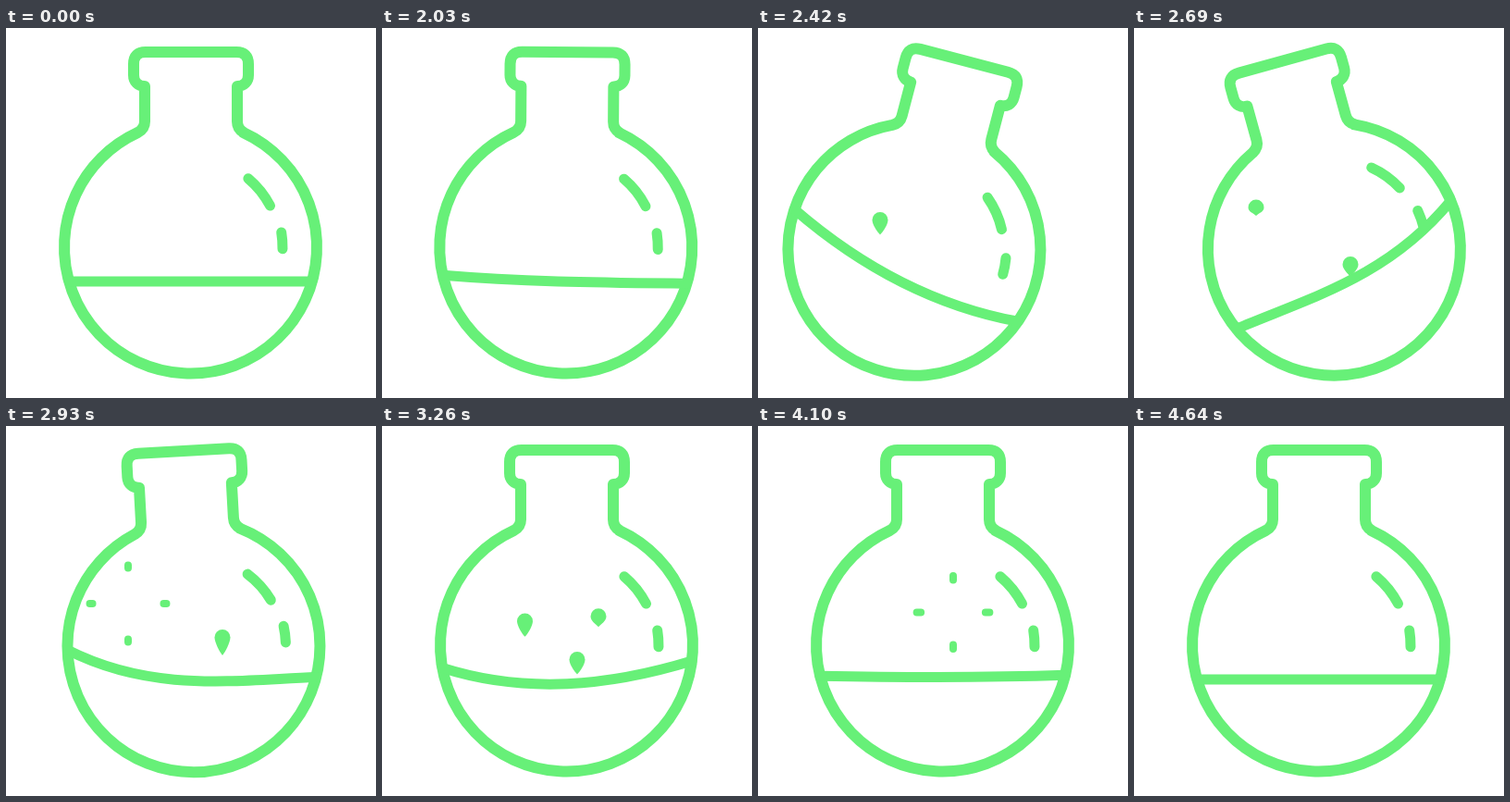
These frames come from a looping animation (400x400 px, 4670 ms). An HTML page with a canvas:

```html
<!DOCTYPE html>
<html lang="en">
<head>
<meta charset="utf-8">
<title>Bubbling flask</title>
<style>
  html, body { margin: 0; width: 100%; height: 100%; overflow: hidden; background: #fff; }
  canvas { display: block; width: 100vmin; height: 100vmin; }
</style>
</head>
<body>
<canvas id="stage" width="400" height="400"></canvas>
<script>
const ctx = document.getElementById('stage').getContext('2d');
const GREEN = '#67f078';
const LOOP = 4670;
const CX = 199.5, CY = 237, RADIUS = 136.5, LEVEL = 37;
const START = 2000, END = 4640;
const BURST_TIME = 300, BURST_REACH = 46;

const DROPS = [
  { x: 132, y: 192, start: 2035, pop: 2708 },
  { x: 234, y: 201, start: 2650, pop: 3385 },
  { x: 154.5, y: 192.5, start: 2960, pop: 3536 },
  { x: 211, y: 201.5, start: 3195, pop: 3897 },
];

const smooth = u => u * u * (3 - 2 * u);
const easeOut = u => 1 - Math.pow(1 - u, 1.7);
const radians = degrees => degrees * Math.PI / 180;

// Eased progress from 0 to 1 between two times
function ramp(t, from, to, ease = smooth) {
  return ease(Math.min(1, Math.max(0, (t - from) / (to - from))));
}

// The flask swings right, then left, then back upright
function swing(t) {
  const right = ramp(t, START, 2360);
  const left = ramp(t, 2360, 2700);
  const back = ramp(t, 2700, 3025);
  const angle = 17.5 * right - 33 * left + 15.5 * back;
  return {
    angle,
    dx: -35 * right + 52 * left - 17 * back,
    dy: 4 * (right - back) - 2 * (angle / 16) ** 2,
  };
}

const calm = t => 1 - ramp(t, 2930, END);

// The liquid is thrown to each side once, then rocks with a fading wave
function tilt(t) {
  const crest = 2690;
  if (t < crest) return -28 * ramp(t, START, 2400, easeOut) + 64 * ramp(t, 2420, crest);
  const since = t - crest;
  return 36 * calm(t) * Math.exp(-since / 490) * Math.cos(Math.PI * since / 240);
}

// Heights of the surface's four Bezier points; the middle lags behind the ends
function surface(t) {
  const rise = 18 * ramp(t, START, 2400, easeOut) * calm(t);
  const bob = 18 * calm(t) * ramp(t, 2930, 3680) * Math.sin(Math.PI * (END - t) / -320 + Math.PI);
  const lean = tilt(t), lag = 0.4 * tilt(t - 150);
  const sag = 0.38 * rise + bob;
  return [lean - rise, sag + lag, sag - lag, -lean - rise].map(y => y + LEVEL);
}

function drawOutline() {
  ctx.lineWidth = 12;
  ctx.beginPath();
  ctx.moveTo(150, 63);
  ctx.bezierCurveTo(143, 63, 138, 58, 138, 51);
  ctx.lineTo(138, 39);
  ctx.quadraticCurveTo(138, 26, 151, 26);
  ctx.lineTo(249, 26);
  ctx.quadraticCurveTo(262, 26, 262, 39);
  ctx.lineTo(262, 51);
  ctx.bezierCurveTo(262, 58, 257, 63, 250, 63);
  ctx.lineTo(250, 101);
  ctx.quadraticCurveTo(250, 109, 257, 113);
  ctx.arc(CX, CY, RADIUS, radians(-65.3), radians(245.3));
  ctx.quadraticCurveTo(150, 109, 150, 101);
  ctx.closePath();
  ctx.stroke();
}

function drawShine(radius, from, to) {
  ctx.lineWidth = 11;
  ctx.beginPath();
  ctx.arc(CX, CY, radius, radians(from), radians(to));
  ctx.stroke();
}

function drawLiquid(t) {
  const [left, inLeft, inRight, right] = surface(t);
  const edge = y => Math.sqrt(RADIUS * RADIUS - y * y);
  const x0 = CX - edge(left), x1 = CX + edge(right);
  const third = (x1 - x0) / 3;
  ctx.lineWidth = 11;
  ctx.beginPath();
  ctx.moveTo(x0, CY + left);
  ctx.bezierCurveTo(x0 + third, CY + inLeft, x1 - third, CY + inRight, x1, CY + right);
  ctx.stroke();
}

function drawFlask(t) {
  const { angle, dx, dy } = swing(t);
  ctx.save();
  ctx.translate(CX + dx, CY + dy);
  ctx.rotate(radians(angle));
  ctx.translate(-CX, -CY);
  drawOutline();
  drawShine(97, -50, -27.6);
  drawShine(99.5, -9.3, 1);
  drawLiquid(t);
  ctx.restore();
}

// A teardrop whose tail shrinks until it is a round bubble
function drawBubble({ x, y }, u) {
  const r = 8.5;
  const cy = y + 2 + 58 * (1 - easeOut(u));
  const tip = cy + r + 17.5 * (1 - u) * Math.min(1, 5 * u);
  ctx.beginPath();
  ctx.arc(x, cy, r, Math.PI, 0);
  ctx.bezierCurveTo(x + r, cy + 5, x + 3, tip - 3, x, tip);
  ctx.bezierCurveTo(x - 3, tip - 3, x - r, cy + 5, x - r, cy);
  ctx.fill();
}

function drawBurst({ x, y }, u) {
  const inner = BURST_REACH * smooth(u);
  const outer = BURST_REACH * easeOut(u) + 0.01;
  ctx.lineWidth = 8;
  ctx.beginPath();
  for (const [dx, dy] of [[1, 0], [0, 1], [-1, 0], [0, -1]]) {
    ctx.moveTo(x + dx * inner, y + dy * inner);
    ctx.lineTo(x + dx * outer, y + dy * outer);
  }
  ctx.stroke();
}

function drawDrop(drop, t) {
  const { start, pop } = drop;
  if (t < start || t > pop + BURST_TIME) return;
  if (t < pop) drawBubble(drop, (t - start) / (pop - start));
  else drawBurst(drop, (t - pop) / BURST_TIME);
}

function render(now) {
  const t = now % LOOP;
  ctx.fillStyle = '#fff';
  ctx.fillRect(0, 0, 400, 400);
  ctx.fillStyle = ctx.strokeStyle = GREEN;
  ctx.lineCap = ctx.lineJoin = 'round';
  drawFlask(t);
  DROPS.forEach(drop => drawDrop(drop, t));
}

const began = performance.now();
function tick() {
  render(performance.now() - began);
  requestAnimationFrame(tick);
}
tick();
</script>
</body>
</html>
```
